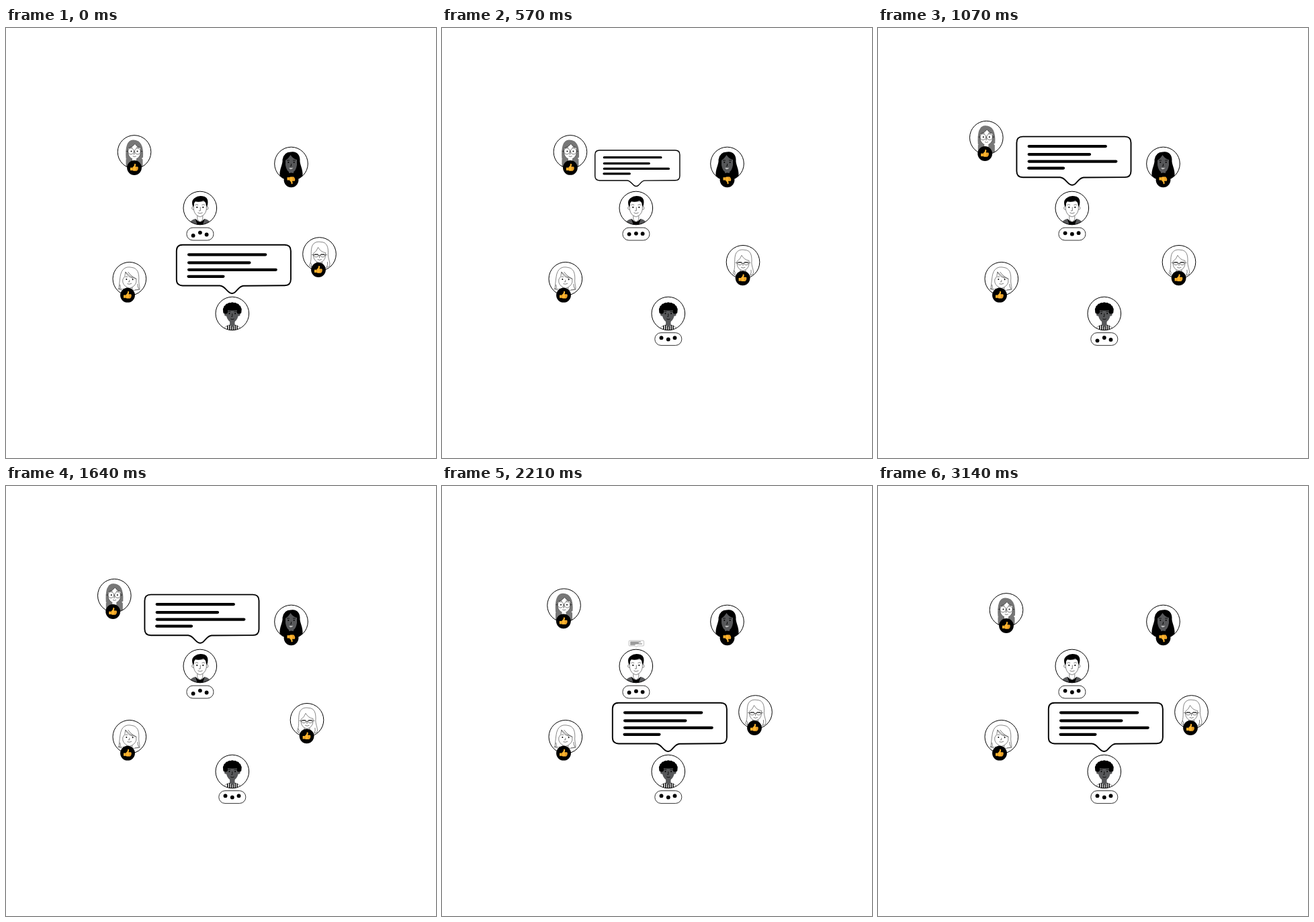
These frames come from a looping animation (640x640 px, 3.21 s). An HTML page:

```html
<!DOCTYPE html>
<html lang="en">
<head>
<meta charset="utf-8">
<title>Group chat</title>
<style>
  html, body { margin: 0; width: 100%; height: 100%; overflow: hidden; background: #fff; }
  svg { display: block; width: 100%; height: 100%; }
  .thin { fill: none; stroke: #222; stroke-width: .6; stroke-linecap: round; stroke-linejoin: round; }
  .paper { fill: #fff; stroke: #222; stroke-width: .55; stroke-linejoin: round; }
  .grey { fill: #777; }
  .dark { fill: #57585a; }
  .ring { fill: none; stroke: #000; stroke-width: 1; }
</style>
</head>
<body>
<svg viewBox="0 0 640 640" xmlns="http://www.w3.org/2000/svg">
  <defs>
    <clipPath id="disc"><circle r="24.7"/></clipPath>

    <g id="thumb">
      <path fill="#ffb52e" d="M-6 -.2H-2.7L-.2 -3.2 .2 -5.7Q1.8 -6.4 2.2 -4.6L1.5 -1.5H4.8Q6.1 -1.1 5.5 .1 6.3 .9 5.4 1.8 5.8 2.8 4.7 3.3 4.8 4.6 3.3 4.8H-1L-2.8 4.1H-6Z"/>
      <path fill="none" stroke="#b56a12" stroke-width=".5" d="M2 .3H5M2 2H5M1.8 3.5H4.4M-2.7 0V4"/>
    </g>

    <g id="bubble">
      <path fill="#fff" stroke="#000" stroke-width="1.9" stroke-linejoin="round" d="M-73.5 -78.8H78.4Q87.5 -78.8 87.5 -69.7V-27.5Q87.5 -18.4 78.4 -18.3L17 -17.9C11 -17.7 8.5 -11.4 4.2 -8.2Q0 -5 -4.2 -8.2C-8.5 -11.2 -12 -18 -18 -18.1H-73.5Q-82.6 -18.3 -82.6 -27.4V-69.7Q-82.6 -78.8 -73.5 -78.8Z"/>
      <path stroke="#000" stroke-width="4.3" stroke-linecap="round" d="M-64.3 -64.3H49.8M-64.3 -52.3H26M-64.3 -41.8H65.3M-64.8 -31.8H-13"/>
    </g>

    <g id="glassesWoman">
      <path class="grey" d="M-12.5 25V11Q-8 6 0 8 8 6 12.5 11V25Z"/>
      <path class="grey" d="M-12.5 10Q-14.5 -17.5 -2 -18 14.5 -18.5 13 8L9 11H-9Z"/>
      <path class="paper" d="M-9.5 -5Q-3 -7 1 -12 4 -7 9.5 -6V1Q8 10 0 11 -8 10 -9.5 1Z"/>
      <path fill="#fff" d="M-3 9H3V14Q0 17 -3 14Z"/>
      <g class="thin"><circle cx="-5" cy="-1" r="4.5"/><circle cx="5" cy="-1" r="4.5"/><path d="M-9.5 -1H-12M9.5 -1H12M0 0V3.5H-1M-2 6.5Q0 8 2.5 6.5M-7 -6.5Q-5 -8 -3 -6.5M3 -6.5Q5 -8 7 -6.5"/></g>
      <circle cx="-4.5" cy="-1" r="1"/><circle cx="4.5" cy="-1" r="1"/>
    </g>

    <g id="darkHairWoman">
      <path d="M0 -17.5C8 -19 13 -13 13 -6 12 0 18 8 17 19Q12 25 0 25T-17 19C-18 8 -12 0 -13 -6Q-11 -18 0 -17.5Z"/>
      <path class="dark" d="M-8.5 -5Q-4 -8 -1 -13 3 -7 8.5 -6V2Q7 10 3.5 12V16H-3.5V12Q-7 10 -8.5 2Z"/>
      <path fill="none" stroke="#000" stroke-width=".8" d="M-6.5 -5H-2.5M2.5 -5H6.5M0 0V3.5H-1.5"/>
      <circle cx="-4.2" cy="-2" r="1"/><circle cx="4.2" cy="-2" r="1"/>
      <path fill="#ccc" d="M-3.5 6Q0 6.8 3 5.7 1 8.6 -1.5 8.2Z"/>
    </g>

    <g id="man">
      <path class="dark" d="M-17 25Q-15 18 -7 16L0 21 7 16Q15 18 17 25Z"/>
      <path d="M-7 16L-4 25H4L7 16 3 20H-3Z"/>
      <path class="paper" d="M-4 9V17L0 21 4 17V9Z"/>
      <g class="paper"><circle cx="-10" cy="0" r="2.2"/><circle cx="10" cy="0" r="2.2"/><path d="M-9.5 -10H9.5V2Q8 11 0 13 -8 11 -9.5 2Z"/></g>
      <path d="M-10.5 -2Q-14 -11 -8 -15 -2 -20 7 -17 14 -14 10.5 -2L9 -4Q9 -9 5 -11 -1 -8 -7 -10 -9 -8 -9 -4Z"/>
      <circle cx="-4.5" cy="-1.2" r="1.1"/><circle cx="4.5" cy="-1.2" r="1.1"/>
      <path class="thin" d="M-7 -4.7Q-5 -6 -3 -4.7M3 -4.7Q5 -6 7 -4.7M.5 -1V4H-1.5M-3 7Q0 9.5 3.5 7"/>
    </g>

    <g id="fairWoman">
      <path class="paper" d="M-15 17C-11 9 -13 2 -12 -7 -11 -18 -3 -19 2 -18 12 -18 13 -9 13 -2 12 7 17 12 15 18L8 21H-9Z"/>
      <path class="paper" d="M-9 -1Q-4 -4 -2 -10 2 -3 9 -2V3Q8 11 0 13 -8 11 -9 3Z"/>
      <path class="thin" d="M-4 12V17Q0 20 4 17V12M-8 1H-1.5V3Q-5 6 -8 3ZM1.5 1H8V3Q5 6 1.5 3ZM-1.5 2H1.5M-9 1H-11M9 1H11M0 3V5.5M-2.5 8Q0 10 3 8M-13 13Q-11 16 -12 18M12 12Q13 16 11 19"/>
      <path stroke="#000" stroke-width=".9" d="M-7.5 .4H-2M2 .4H7.5"/>
    </g>

    <g id="bobWoman">
      <path class="paper" d="M-16 15C-15 10 -15 2 -13 -7 -10 -18 -2 -18 3 -17 13 -16 14 -7 14 0 13 8 17 14 14 16L8 17H-11Z"/>
      <path class="paper" d="M-10 1Q-6 -3 -6 -10 0 -3 10 0V5Q8 12 0 14 -8 12 -10 5Z"/>
      <path class="thin" d="M-6 -10Q-2 -2 5 -1M-2 -10Q2 -4 10 0M-4 13V18M4 13V18M-6 -3H-3M0 2V4.5H-1.5M-3 7.5Q0 8.8 3 7M-14 9Q-13 13 -14 15M12 8Q12 12 14 15"/>
      <path stroke="#222" stroke-width="1" stroke-dasharray="1 1.4" d="M-17 15H-9M9 16H16"/>
      <circle cx="-4.5" cy=".6" r="1"/><circle cx="4.8" cy="1" r="1"/>
    </g>

    <g id="curlyMan">
      <path class="paper" d="M-13 25Q-11 18 -4 17H4Q11 18 13 25Z"/>
      <path stroke="#000" stroke-width="1.5" d="M-7 18V25M-4 17V25M-1.2 17V25M1.6 17V25M4.4 17V25M7.2 18V25"/>
      <path class="dark" d="M-3.7 10H3.7V17L0 20 -3.7 17Z"/>
      <g class="dark"><circle cx="-9.5" cy="1.5" r="2.3"/><circle cx="9.5" cy="1.5" r="2.3"/><path d="M-9 -9H9V3Q7 12 0 14 -7 12 -9 3Z"/></g>
      <g id="curls"></g>
      <path d="M-11 -10H11V-6Q0 -3 -11 -6Z"/>
      <circle cx="-4.3" cy="0" r="1"/><circle cx="4.3" cy="0" r="1"/>
      <path fill="none" stroke="#000" stroke-width=".8" d="M-6.5 -3H-2.5M2.5 -3H6.5M0 0V4.5H-1.5M-2.5 8Q0 9.5 2.8 8"/>
    </g>
  </defs>
  <rect width="640" height="640" fill="#fff"/>
  <g id="stage"></g>
</svg>

<script>
const LOOP = 3210, FPS = 14;
const stage = document.getElementById('stage');

function add(parent, tag, attrs = {}) {
  const node = document.createElementNS('http://www.w3.org/2000/svg', tag);
  for (const key in attrs) node.setAttribute(key, attrs[key]);
  parent.appendChild(node);
  return node;
}
const place = (node, x, y, scale = 1) =>
  node.setAttribute('transform', `translate(${x} ${y}) scale(${scale})`);

function avatar(name, x, y) {
  const group = add(stage, 'g');
  add(group, 'circle', { r: 24.8, fill: '#fff' });
  add(add(group, 'g', { 'clip-path': 'url(#disc)' }), 'use', { href: '#' + name });
  add(group, 'circle', { r: 24.8, class: 'ring' });
  place(group, x, y);
  return group;
}

function badge(x, y, down) {
  const group = add(stage, 'g');
  add(group, 'circle', { r: 10.9 });
  add(group, 'use', { href: '#thumb', transform: down ? 'scale(1 -1)' : '' });
  place(group, x, y);
  return group;
}

function typing(x, y) {
  const group = add(stage, 'g');
  add(group, 'rect', { x: -20, y: -9.4, width: 40, height: 18.8, rx: 9.2, fill: '#fff', stroke: '#000', 'stroke-width': .8 });
  const dots = [-10.3, 0, 9.7].map(cx => add(group, 'circle', { cx, r: 2.9 }));
  place(group, x, y);
  return { group, dots };
}

const curls = document.getElementById('curls');
for (let i = 0; i < 11; i++) {
  const a = Math.PI * (1.08 - i * .116);
  add(curls, 'circle', { cx: 10.5 * Math.cos(a), cy: -5 - 8.3 * Math.sin(a), r: 3.5 });
}
add(curls, 'ellipse', { cy: -10, rx: 10, ry: 5 });

const bubbles = [0, 1].map(() => add(stage, 'use', { href: '#bubble' }));
const left = avatar('glassesWoman', 191, 184.5);
const leftBadge = badge(191, 208);
avatar('darkHairWoman', 424.5, 202);
badge(424.5, 226.3, true);
avatar('man', 288.8, 268);
const right = avatar('fairWoman', 466.5, 336.5);
const rightBadge = badge(465, 360);
avatar('bobWoman', 183.8, 373.3);
badge(181, 397.7);
avatar('curlyMan', 336.8, 425);
const upper = typing(288.9, 306.6);
const lower = typing(336.8, 463);

const clamp = x => Math.max(0, Math.min(1, x));
const easeOut = (t, start, length) => 1 - (1 - clamp((t - start) / length)) ** 2;
const mix = (a, b, k) => a + (b - a) * k;

// Smooth interpolation through [time, value] keys
function track(keys, t) {
  let i = 0;
  while (i < keys.length - 2 && t >= keys[i + 1][0]) i++;
  const [[t0, a], [t1, b]] = [keys[i], keys[i + 1]];
  const x = clamp((t - t0) / (t1 - t0));
  return mix(a, b, x * x * (3 - 2 * x));
}

const upperKeys = [[0, 0], [350, 1], [790, 0], [1150, 1], [1640, 0], [1930, 1], [2400, 0], [2860, 1]];
const lowerKeys = [[70, 0], [570, 1], [1070, 0], [1640, 1], [1930, 0], [2210, 1], [2780, 0], [3140, 1]];

function bounce(pill, k) {
  const range = [[2.3, -1.8], [-2, .4], [.9, -1.8]];
  pill.dots.forEach((dot, i) => dot.setAttribute('cy', mix(...range[i], k)));
}

function showBubble(node, x, y, scale) {
  node.style.display = scale > .01 ? '' : 'none';
  place(node, x, y, scale);
}

function draw(t) {
  const grow = start => easeOut(t, start, 320);
  const slide = start => easeOut(t, start, 265);

  showBubble(bubbles[0], 289, 240.4, grow(414) - grow(2010));
  showBubble(bubbles[1], 336.4, 401.6, 1 - grow(70) + grow(1648));

  const away = slide(571) - slide(2099);
  place(left, mix(191, 161.3, away), mix(184.5, 163.2, away));
  place(leftBadge, mix(191, 159.2, away), mix(208, 187, away));

  const near = slide(140) - slide(1714);
  const nearBadge = slide(170) - slide(1759);
  place(right, mix(466.5, 448, near), mix(336.5, 348.3, near));
  place(rightBadge, mix(465, 447.6, nearBadge), mix(360, 372.3, nearBadge));

  lower.group.style.display = t < 70 ? 'none' : '';
  bounce(upper, track(upperKeys, t));
  bounce(lower, track(lowerKeys, t));
}

const began = performance.now();
function tick() {
  const t = (performance.now() - began) % LOOP;
  draw(Math.floor((t + 5) * FPS / 1000) * 1000 / FPS);
  requestAnimationFrame(tick);
}
tick();
</script>
</body>
</html>
```
